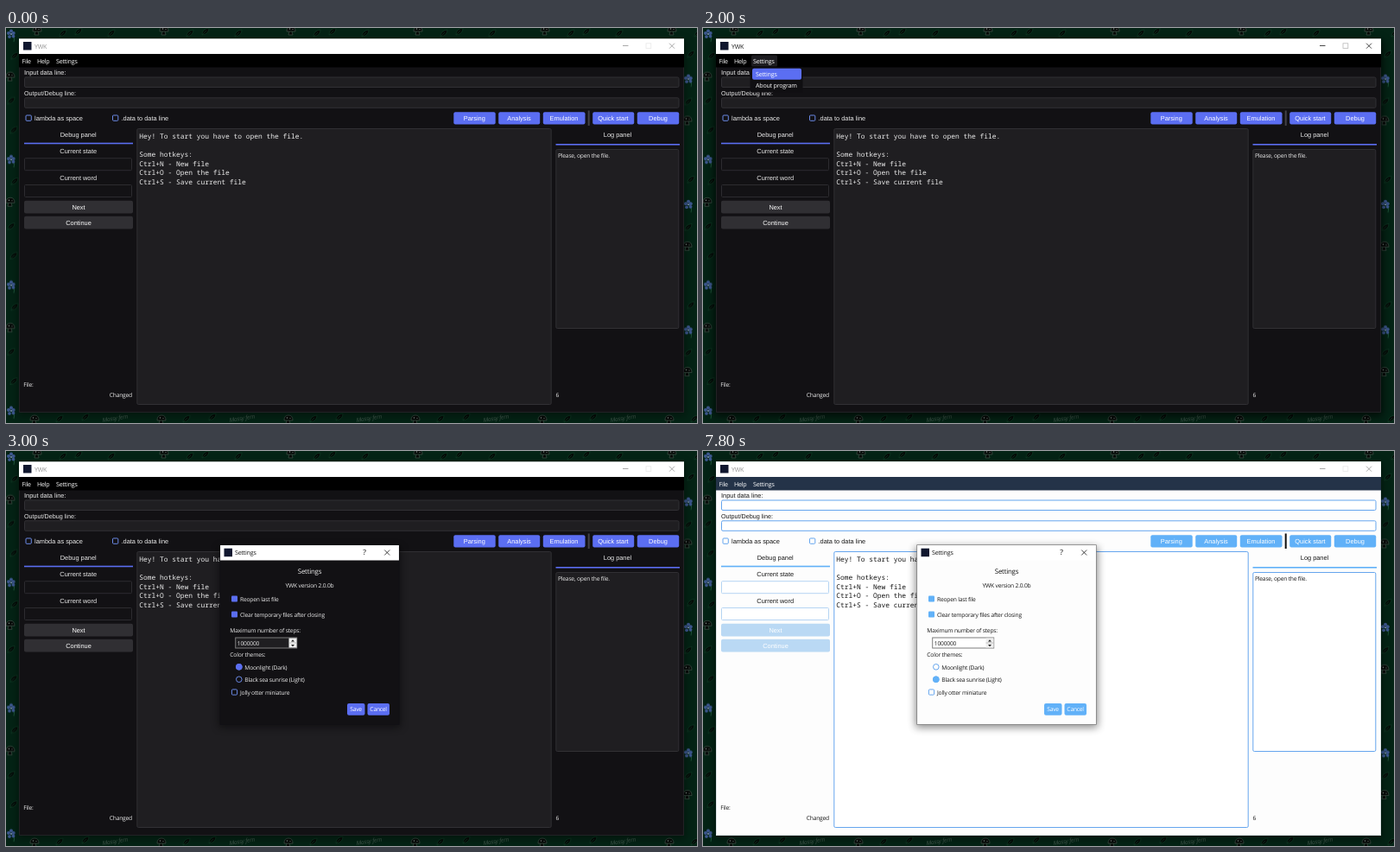
Recreate the animation shown at these times as an HTML page. Size 800 by 457 pixels, loop 8 s.

```html
<!DOCTYPE html>
<html lang="en">
<head>
<meta charset="utf-8">
<title>Settings dialog</title>
<style>
html, body { margin: 0; height: 100%; overflow: hidden; background: #04150d; }
svg { display: block; width: 100vw; height: 100vh; }
#stage { animation: theme 8s step-end infinite; }
#app { animation: focus 8s step-end infinite; }
#hover { animation: hover 8s step-end infinite; }
#menu { animation: menu 8s step-end infinite; }
#pick { animation: pick 8s step-end infinite; }
#dialog { transform-origin: 351.5px 212.5px; animation: dialog 8s step-end infinite; }
#dark { animation: off 8s step-end infinite; }
#light { animation: on 8s step-end infinite; }

@keyframes theme {
  0% {
    --bg: #121114; --bar: #000; --fg: #ececec; --field: #1f1e21; --line: #313034; --acc: #5b6ef2;
    --slot: #131215; --rim: #2d2c30;
    --check: #6b8ae6; --btn: #302f33; --sep: #424146; --edge: #2a2a2d; --frame: #121114;
  }
  97.5%, 100% {
    --bg: #fdfdfd; --bar: #243348; --fg: #161616; --field: #fff; --line: #65a5ee; --acc: #61b1f8;
    --slot: #fff; --rim: #b5d4f3;
    --check: #65a5ee; --btn: #bad9f4; --sep: #111; --edge: #d5dbe0; --frame: #747474;
  }
}
@keyframes focus {
  0%, 32.5%, 100% { --title: #939393; --max: #e8e8e8; --shade: .35; }
  17.5% { --title: #1b1b1b; --max: #b8b8b8; --shade: .65; }
}
@keyframes hover { 0%, 32.5%, 100% { opacity: 0; } 12.5% { opacity: 1; } }
@keyframes menu { 0%, 32.5%, 100% { opacity: 0; } 17.5% { opacity: .4; } 20% { opacity: 1; } }
@keyframes pick { 0%, 32.5%, 100% { opacity: 0; } 25% { opacity: 1; } }
@keyframes dialog {
  0% { opacity: 0; transform: none; }
  32.5% { opacity: .1; transform: scale(.957); }
  35% { opacity: .95; transform: scale(.995); }
  37.5%, 100% { opacity: 1; transform: none; }
}
@keyframes off { 0% { opacity: 1; } 97.5%, 100% { opacity: 0; } }
@keyframes on { 0% { opacity: 0; } 97.5%, 100% { opacity: 1; } }

text { font: 7.4px "Liberation Sans", Arial, sans-serif; fill: var(--fg); text-rendering: geometricPrecision; white-space: pre; }
.ui text, text.ui { font: 6.7px "Open Sans", sans-serif; letter-spacing: -.03em; }
.ui text.big, text.bar { font: 7.1px "Open Sans", sans-serif; letter-spacing: -.03em; }
.ui text.head { font-size: 7.9px; }
.mono text { font: 7.93px "Noto Sans Mono", monospace; }
.mid { text-anchor: middle; }
.end { text-anchor: end; }
text.white, .ui text.white { fill: #fff; }
text.title { fill: var(--title); }
.field { fill: var(--field); stroke: var(--line); }
.slot { fill: var(--slot); stroke: var(--rim); }
.acc { fill: var(--acc); }
.btn { fill: var(--btn); }
.box { fill: none; stroke: var(--check); }
.caps { fill: none; stroke: var(--title); stroke-width: .8; }
.logo { fill: #10172f; }
</style>
</head>
<body>
<svg id="stage" viewBox="0 0 800 457" preserveAspectRatio="none">
<defs>
  <filter id="blur" x="-10%" y="-10%" width="120%" height="120%"><feGaussianBlur stdDeviation="5"/></filter>
  <g id="flower">
    <path d="M0 0q5 3 3 9" fill="none" stroke="#1c5237"/>
    <g fill="#3d5890"><circle cx="-3" cy="-1" r="2"/><circle cx="2.7" cy="-1" r="2"/><circle cy="-3.5" r="2"/><circle cx="-2" cy="3" r="1.9"/><circle cx="2.5" cy="2.5" r="1.9"/></g>
    <circle r="1" fill="#8295bb"/>
  </g>
  <g id="cap">
    <path d="M-5 1q0-6 5-6t5 6zM-2 1l-1 4h5l-1-4" fill="#060a08" stroke="#3f5148" stroke-width=".7"/>
    <circle cx="-1.5" cy="-2" r=".8" fill="#7d8a83"/><circle cx="2" cy="-1.5" r=".6" fill="#7d8a83"/>
  </g>
  <path id="leaf" d="M-4 4q0-7 8-8q0 7-8 8l5-5" fill="#050b08" stroke="#0b3a22" stroke-width=".7"/>
  <pattern id="sides" width="800" height="145.3" patternUnits="userSpaceOnUse">
    <use href="#flower" x="6" y="7"/><use href="#leaf" x="10" y="32"/><use href="#cap" x="5" y="56"/><use href="#leaf" x="6" y="84"/><use href="#leaf" x="9" y="118"/>
    <use href="#flower" x="790" y="59"/><use href="#leaf" x="793" y="30"/><use href="#leaf" x="790" y="85"/><use href="#cap" x="789" y="107"/>
  </pattern>
  <pattern id="edges" width="147" height="457" patternUnits="userSpaceOnUse">
    <use href="#cap" x="36" y="3"/><use href="#leaf" x="66" y="6"/><use href="#leaf" x="84" y="4"/><use href="#leaf" x="122" y="6"/>
    <use href="#cap" x="33" y="453"/><use href="#leaf" x="62" y="452"/><use href="#leaf" x="92" y="450"/>
    <text class="ui" x="112" y="456" transform="rotate(-9 112 456)" style="fill:#3f564a;font-style:italic">Mossy fern</text>
  </pattern>
</defs>

<rect width="800" height="457" fill="#042315"/>
<rect width="800" height="457" fill="url(#edges)"/>
<rect width="800" height="457" fill="url(#sides)"/>

<g id="app">
  <rect x="13" y="14" width="774" height="435" filter="url(#blur)" style="opacity:var(--shade)"/>
  <rect x="15" y="12.3" width="770" height="432.7" style="fill:var(--bg)"/>
  <path d="M15.5 30V444.5H784.5V30" fill="none" style="stroke:var(--edge)" stroke-width=".7"/>
  <rect x="15" y="12.3" width="770" height="17.7" fill="#fff"/>
  <rect class="logo" x="20" y="16" width="9.5" height="9.5"/>
  <text class="bar title" x="33" y="23.6">YWK</text>
  <path class="caps" d="M714 20.5h6.5M768 17.7l6 6m0-6l-6 6"/>
  <rect x="741" y="17.8" width="5.8" height="5.8" fill="none" stroke-width=".8" style="stroke:var(--max)"/>

  <rect x="15" y="30" width="770" height="15.5" style="fill:var(--bar)"/>
  <rect id="hover" x="56" y="31.5" width="30" height="13" rx="1.5" fill="#1d1c20"/>
  <text class="bar white" x="18.5" y="40.8">File</text>
  <text class="bar white" x="36" y="40.8">Help</text>
  <text class="bar white" x="58" y="40.8">Settings</text>

  <text x="21" y="53.7">Input data line:</text>
  <rect class="field" x="21.5" y="57" width="757.5" height="11.5" rx="1.5"/>
  <text x="21" y="77.5" style="font-size:7.2px">Output/Debug line:</text>
  <rect class="field" x="21.5" y="80.8" width="757.5" height="11.5" rx="1.5"/>

  <rect class="box" x="23" y="101" width="6.3" height="6.3" rx="1"/>
  <text x="33" y="107">lambda as space</text>
  <rect class="box" x="123.5" y="101" width="6.3" height="6.3" rx="1"/>
  <text x="133.5" y="107">.data to data line</text>

  <g class="acc">
    <rect x="518.3" y="97.2" width="48.4" height="14.4" rx="2"/>
    <rect x="570.2" y="97.2" width="48" height="14.4" rx="2"/>
    <rect x="621.8" y="97.2" width="48.7" height="14.4" rx="2"/>
    <rect x="679.2" y="97.2" width="48" height="14.4" rx="2"/>
    <rect x="730.8" y="97.2" width="48.4" height="14.4" rx="2"/>
  </g>
  <rect x="673.7" y="95.5" width="2" height="17.5" style="fill:var(--sep)"/>
  <g class="mid">
    <text class="white" x="542.3" y="107">Parsing</text>
    <text class="white" x="594" y="107">Analysis</text>
    <text class="white" x="646" y="107">Emulation</text>
    <text class="white" x="703" y="107">Quick start</text>
    <text class="white" x="755" y="107">Debug</text>

    <text x="83.7" y="125.7">Debug panel</text>
    <text x="83.7" y="145.2">Current state</text>
    <text x="83.7" y="176.2">Current word</text>
    <text x="708" y="126.4">Log panel</text>
  </g>
  <rect class="acc" x="21" y="132.7" width="126" height="1.6"/>
  <rect class="acc" x="636.5" y="134" width="143.5" height="1.6"/>

  <rect class="slot" x="21.5" y="150.7" width="124" height="14" rx="1"/>
  <rect class="slot" x="21.5" y="181.5" width="124" height="14" rx="1"/>
  <rect class="btn" x="21" y="199.7" width="126" height="14.8" rx="2"/>
  <rect class="btn" x="21" y="217.8" width="126" height="14.8" rx="2"/>
  <text class="mid white" x="84" y="209.7">Next</text>
  <text class="mid white" x="84" y="227.8">Continue</text>

  <rect class="field" x="151.8" y="116.5" width="479.4" height="319" rx="1.5"/>
  <g class="mono">
    <text x="154.2" y="127.8">Hey! To start you have to open the file.</text>
    <text x="154.2" y="149">Some hotkeys:</text>
    <text x="154.2" y="159.7">Ctrl+N - New file</text>
    <text x="154.2" y="170.3">Ctrl+O - Open the file</text>
    <text x="154.2" y="181">Ctrl+S - Save current file</text>
  </g>

  <rect class="field" x="636.8" y="140.5" width="142" height="207" rx="1.5"/>
  <g class="ui">
    <text x="639" y="149.8">Please, open the file.</text>
    <text x="20.3" y="414.8">File:</text>
    <text class="end" x="146" y="427">Changed</text>
    <text x="636.5" y="427">6</text>
  </g>

  <g id="menu" class="ui">
    <rect x="54.5" y="45.5" width="61" height="29" fill="#100f12"/>
    <rect id="pick" class="acc" x="57" y="46.7" width="57" height="13" rx="2"/>
    <text class="big white" x="61" y="55.8">Settings</text>
    <text class="big white" x="61" y="69.4">About program</text>
  </g>
</g>

<g id="dialog" class="ui">
  <rect x="246" y="111" width="211" height="209" filter="url(#blur)" opacity=".45"/>
  <rect x="248" y="109" width="207" height="207.3" style="fill:var(--bg)"/>
  <rect x="248" y="109" width="207" height="17.5" fill="#fff"/>
  <rect x="247.7" y="108.7" width="207.6" height="207.8" fill="none" stroke-width=".7" style="stroke:var(--frame)"/>
  <rect class="logo" x="252.5" y="112.7" width="9.5" height="9.5"/>
  <text class="big" x="265" y="120.3" style="fill:#151515">Settings</text>
  <text class="big mid" x="415" y="120.4" style="fill:#111;font-size:8.5px">?</text>
  <path d="M438.2 114.5l6 6m0-6l-6 6" stroke="#111" stroke-width=".8"/>

  <text class="head mid" x="351.5" y="142.2">Settings</text>
  <text class="mid" x="351.5" y="158.2">YWK version 2.0.0b</text>
  <rect class="acc" x="261" y="167.5" width="7" height="7" rx="1"/>
  <text x="271" y="173.8">Reopen last file</text>
  <rect class="acc" x="261" y="185.4" width="7" height="7" rx="1"/>
  <text x="271" y="191.7">Clear temporary files after closing</text>
  <text x="259.3" y="209.6">Maximum number of steps:</text>

  <rect x="265.7" y="216" width="71" height="12" stroke="#7d7d7d" style="fill:var(--field)"/>
  <rect x="327.5" y="216.5" width="9" height="11" fill="#efefef"/>
  <path d="M327.5 222h9" stroke="#aaa" stroke-width=".7"/>
  <path d="M330 220.4l2-2.2l2 2.2zM330 224l2 2.2l2-2.2z" fill="#222"/>
  <text x="267.8" y="224.7">1000000</text>

  <text x="259.3" y="238">Color themes:</text>
  <g class="box"><circle cx="269.8" cy="249.8" r="3.3"/><circle cx="269.8" cy="264.2" r="3.3"/></g>
  <circle id="dark" class="acc" cx="269.8" cy="249.8" r="3.8"/>
  <circle id="light" class="acc" cx="269.8" cy="264.2" r="3.8"/>
  <text x="276.3" y="252.6">Moonlight (Dark)</text>
  <text x="276.3" y="267">Black sea sunrise (Light)</text>
  <rect class="box" x="261.4" y="275.9" width="6.2" height="6.2" rx="1"/>
  <text x="271" y="281.8">Jolly otter miniature</text>

  <rect class="acc" x="395" y="292" width="20.5" height="13.7" rx="2"/>
  <rect class="acc" x="418.5" y="292" width="25.5" height="13.7" rx="2"/>
  <text class="mid white" x="405.1" y="301.3">Save</text>
  <text class="mid white" x="431.1" y="301.3">Cancel</text>
</g>
</svg>
</body>
</html>
```
